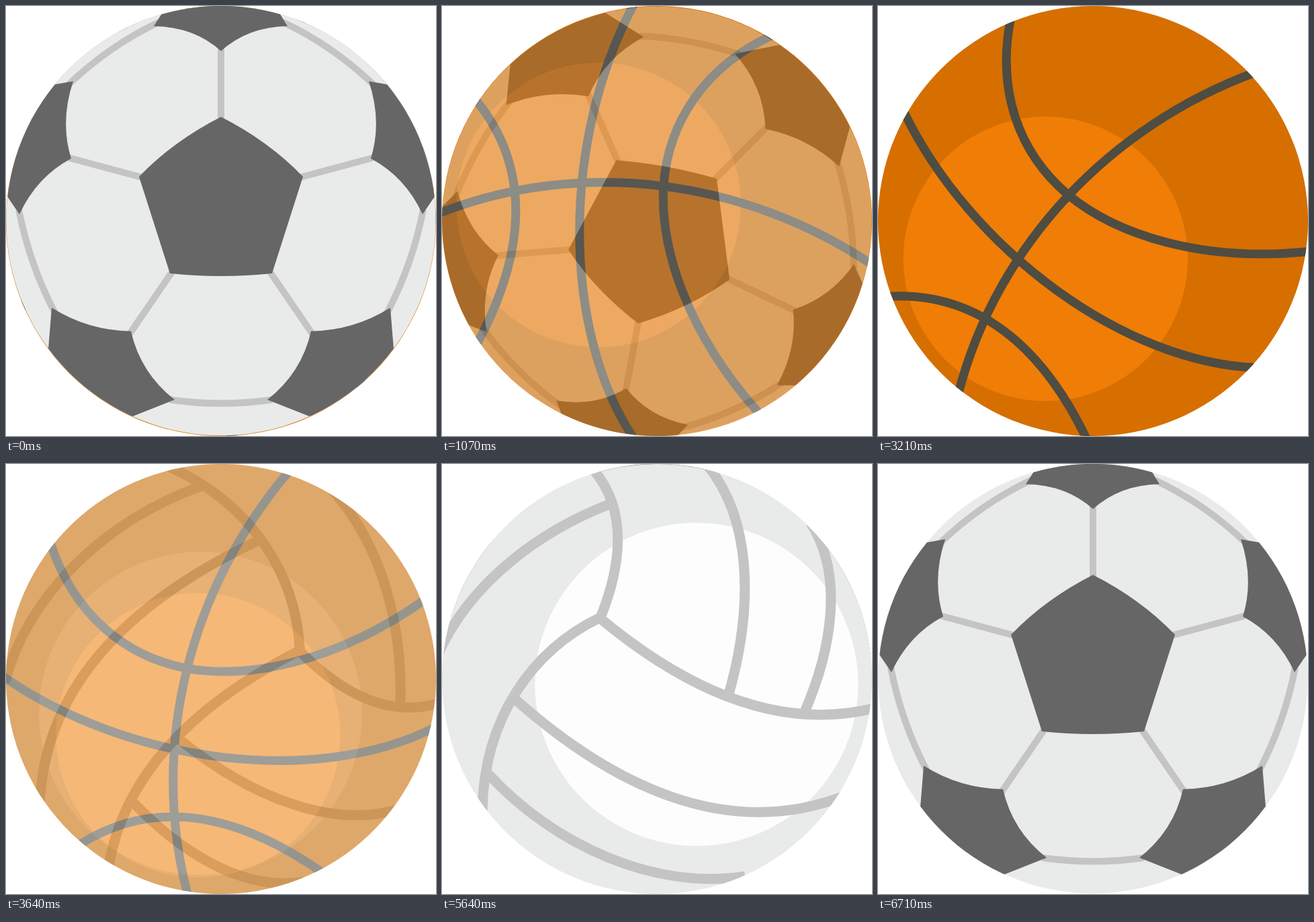
An HTML page with a canvas for the animation above (8000 ms loop, 640 by 640 pixels).

```html
<!DOCTYPE html>
<html lang="en">
<head>
<meta charset="utf-8">
<title>Spinning balls</title>
<style>
html, body { margin: 0; width: 100%; height: 100%; overflow: hidden; background: #fff; }
canvas { display: block; width: 640px; height: 640px; }
</style>
</head>
<body>
<canvas id="stage" width="640" height="640"></canvas>
<script>
const SIZE = 640, MID = SIZE / 2;
const LOOP = 8000, STEP = LOOP / 112;
const SPACING = 2630, SWAP_START = 604, SWAP_END = 1454;

const stage = document.getElementById('stage').getContext('2d');
const layer = Object.assign(document.createElement('canvas'), { width: SIZE, height: SIZE }).getContext('2d');

const LIGHT = '#e9ebea', GREY = '#c3c4c3', DARK = '#666666';

function disc(g, x, y, r, color) {
  g.fillStyle = color;
  g.beginPath();
  g.arc(x, y, r, 0, 2 * Math.PI);
  g.fill();
}

function lines(g, color, width, path) {
  g.strokeStyle = color;
  g.lineWidth = width;
  g.stroke(new Path2D(path));
}

function patch(g, path) {
  g.fillStyle = DARK;
  g.fill(new Path2D(path));
}

function mirrored(g, draw) {
  draw();
  g.save();
  g.translate(SIZE, 0);
  g.scale(-1, 1);
  draw();
  g.restore();
}

const soccer = {
  y: 319.5, r: 319.7, base: LIGHT,
  detail(g) {
    lines(g, GREY, 10, 'M320 60V170 M244 586Q320 597 396 586');
    mirrored(g, () => {
      lines(g, GREY, 10, 'M94 226L202 255 M247 396L184 488 M228 24Q155 58 93 117 M19 303Q35 385 73 457');
      patch(g, 'M100 112Q80 172 97 227Q46 254 20 310L-8 269L-20 180L45 121.5Z');
      patch(g, 'M68 449Q122 483 186 484Q200 546 251 586L165 620L100 600L61 535Z');
    });
    patch(g, 'M320 165Q391 201 442 254L396 398Q320 406 244 398L198 254Q249 201 320 165Z');
    patch(g, 'M220 30Q280 31 320 67Q360 31 419 30L397 -6H243Z');
  }
};

const basketball = {
  y: 320, r: 320, base: '#d66f00',
  detail(g) {
    disc(g, 405.5, 291, 211.7, '#f07d05');
    lines(g, '#4f4c41', 13,
      'M20 446C245 444 465 338 596 146' +
      'M165 32C345 104 507 340 530 572' +
      'M32 168C190 207 295 290 342 370C389 452 390 550 333 645' +
      'M439 18C450 125 490 272 645 318');
  }
};

const volleyball = {
  y: 320, r: 320, base: LIGHT,
  detail(g) {
    disc(g, 361.5, 277.5, 240.5, '#fdfdfd');
    lines(g, GREY, 15,
      'M14 210C95 205 155 265 197 334C350 297 490 225 548 86' +
      'M196 334C176 440 210 560 324 647' +
      'M108 70C210 65 315 135 402 248' +
      'M270 -2C362 4 440 85 491 174' +
      'M216 508C400 470 575 385 626 200' +
      'M283 606C430 590 570 510 634 390' +
      'M69 222C42 320 35 450 96 560');
  }
};

const balls = [soccer, basketball, volleyball];

function drawBall(ball, degrees, alpha) {
  const g = layer;
  g.clearRect(0, 0, SIZE, SIZE);
  g.save();
  g.translate(MID, MID);
  g.rotate(degrees * Math.PI / 180);
  g.translate(-MID, -MID);
  disc(g, MID, ball.y, ball.r, ball.base);
  g.clip();
  ball.detail(g);
  g.restore();
  stage.globalAlpha = alpha;
  stage.drawImage(g.canvas, 0, 0);
  stage.globalAlpha = 1;
}

const easeInOut = p => p < 0.5 ? 2 * p * p : 1 - 2 * (1 - p) ** 2;

// The leaving ball keeps speeding up until it has faded away.
const spinUp = t => 160 * (t / 584) ** (t < 584 ? 2.6 : 2.036);

function render(time) {
  const t = Math.floor((time % LOOP + 5) / STEP) * STEP % LOOP;
  const index = Math.min(2, Math.floor(t / SPACING));
  const local = t - index * SPACING;
  const current = balls[index], next = balls[(index + 1) % 3];

  stage.fillStyle = '#fff';
  stage.fillRect(0, 0, SIZE, SIZE);

  const p = Math.max(0, Math.min(1, (local - SWAP_START) / (SWAP_END - SWAP_START)));
  const swap = easeInOut(p);
  drawBall(next, 360 * swap, 1);
  if (swap < 1) drawBall(current, spinUp(local), 1 - swap);
}

const begin = performance.now();
function tick() {
  render(performance.now() - begin);
  requestAnimationFrame(tick);
}
tick();
</script>
</body>
</html>
```
